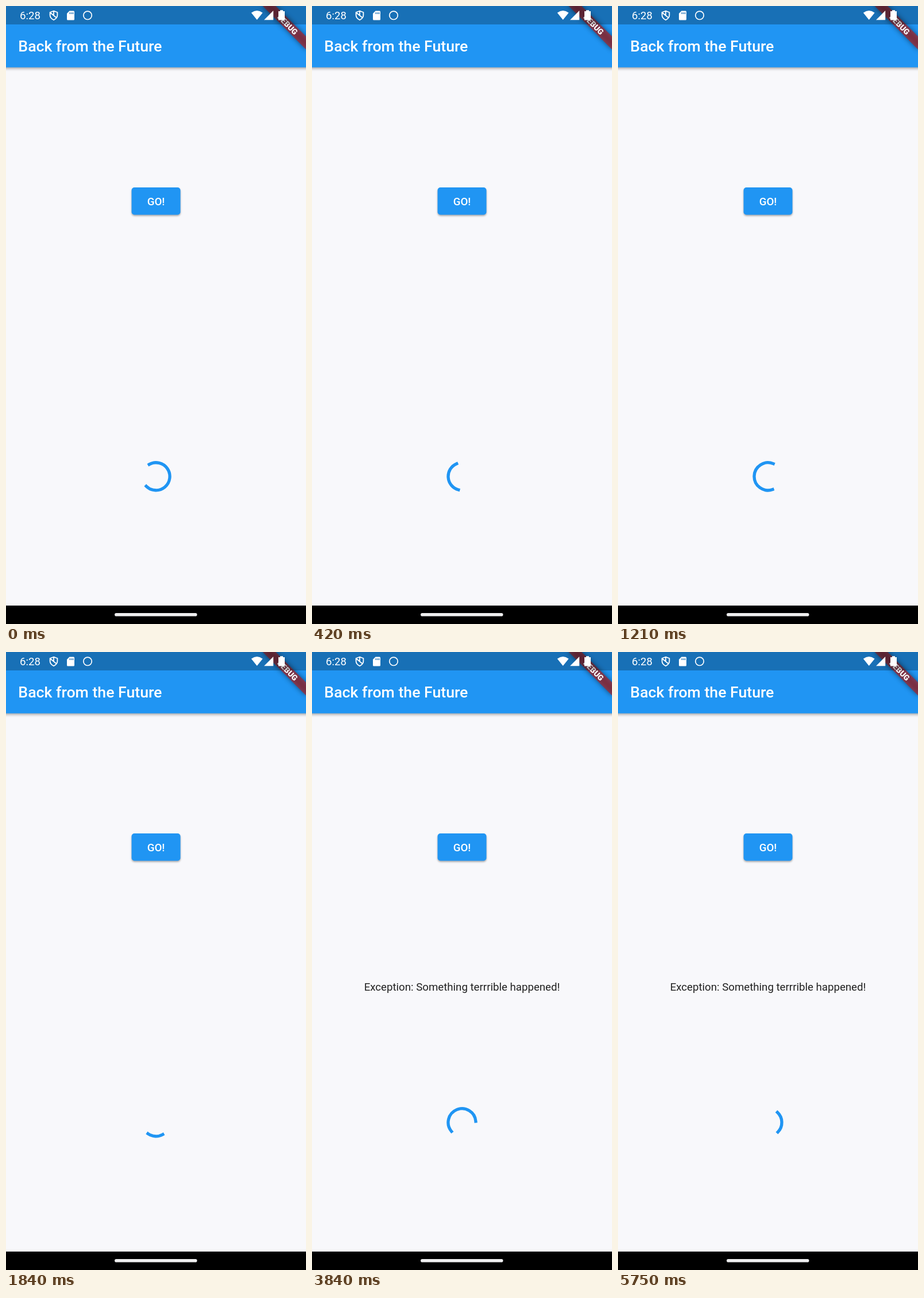
An HTML page for the animation above (5.79 s loop, 522 by 1073 pixels).

```html
<!DOCTYPE html>
<html lang="en">
<head>
<meta charset="utf-8">
<title>Back from the Future</title>
<style>
  html, body { margin: 0; width: 100%; height: 100%; overflow: hidden; background: #f8f8fb; }
  svg { display: block; font-family: Roboto, sans-serif; }
  .bar { filter: drop-shadow(0 2px 2.5px rgba(0, 0, 0, .36)); }
  .button { filter: drop-shadow(0 2px 1.5px rgba(0, 0, 0, .32)); }
  .medium { font-weight: 500; }
</style>
</head>
<body>
<svg width="522" height="1073" viewBox="0 0 522 1073">
  <rect width="522" height="1073" fill="#f8f8fb"/>
  <rect class="bar" x="-10" y="-10" width="542" height="116.5" fill="#2095f3"/>
  <text class="medium" x="21.3" y="79" font-size="26.67" fill="#fff">Back from the Future</text>

  <rect class="button" x="218.5" y="315" width="85" height="47.5" rx="5" fill="#2095f3"/>
  <text class="medium" x="261" y="345.5" font-size="18.67" fill="#fff" text-anchor="middle">GO!</text>

  <text id="message" x="261" y="588" font-size="18.67" fill="#212121" text-anchor="middle">Exception: Something terrrible happened!</text>
  <path id="arc" fill="none" stroke="#2095f3" stroke-width="5.33" stroke-linecap="square"/>

  <!-- debug ribbon -->
  <g transform="translate(522 0) rotate(45)">
    <rect x="-53.3" y="37.3" width="106.6" height="16" opacity=".5" style="filter: blur(5px)"/>
    <rect x="-53.3" y="37.3" width="106.6" height="16" fill="#b71c1c" opacity=".627"/>
    <text y="50.2" font-size="13.6" font-weight="900" fill="#fff" text-anchor="middle">DEBUG</text>
  </g>

  <!-- status bar -->
  <rect width="522" height="32" opacity=".25"/>
  <g fill="#fff">
    <text x="24" y="23" font-size="18.67">6:28</text>
    <path d="M83 8.6L89.4 11V16Q89.2 21.2 83 24.2Q76.8 21.2 76.6 16V11ZM77 11.5L88.5 21M83 9V15.5" fill="none" stroke="#fff" stroke-width="1.8"/>
    <path d="M110.5 8.5H117.5Q119 8.5 119 10V23Q119 24.5 117.5 24.5H107.5Q106 24.5 106 23V13Z"/>
    <path d="M111.3 11V14M114 11V14M116.6 11V14" stroke="#1970b6" stroke-width="1.3"/>
    <circle cx="142" cy="16.3" r="7.2" fill="none" stroke="#fff" stroke-width="1.7"/>
    <path d="M436.7 24L426.8 11.8Q436.7 4.4 446.6 11.8Z"/>
    <path d="M449 24.2H465.2V8Z"/>
    <path d="M477 7.3H482V9H485V24.4H474V9H477Z"/>
  </g>

  <rect y="1041" width="522" height="32"/>
  <rect x="189" y="1054" width="143.5" height="5.6" rx="2.8" fill="#efeff0"/>
</svg>
<script>
  const LOOP = 5790, FRAME = 1000 / 24, MESSAGE_AT = 3300;
  const PATH_PERIOD = 1333, TURN_PERIOD = 2222;
  const CX = 261, CY = 816.8, R = 24;
  const arc = document.getElementById('arc');
  const message = document.getElementById('message');

  // cubic-bezier(.4, 0, .2, 1), clamped outside 0..1
  function ease(x) {
    if (x <= 0) return 0;
    if (x >= 1) return 1;
    let lo = 0, hi = 1, s;
    for (let i = 0; i < 24; i++) {
      s = (lo + hi) / 2;
      const q = 1 - s;
      if (1.2 * q * q * s + .6 * q * s * s + s ** 3 < x) lo = s; else hi = s;
    }
    return 3 * s * s - 2 * s ** 3;
  }

  function point(deg) {
    const a = deg * Math.PI / 180;
    return (CX + R * Math.sin(a)).toFixed(3) + ' ' + (CY - R * Math.cos(a)).toFixed(3);
  }

  function draw(t) {
    const clock = t * 1.0105;
    const cycles = clock / PATH_PERIOD + .354;
    const phase = cycles % 1;
    const head = ease(phase * 2), tail = ease(phase * 2 - 1);
    const start = 298.6 + 360 * clock / TURN_PERIOD + 90 * phase + 270 * tail;
    const sweep = Math.max(270 * (head - tail), .5);
    arc.setAttribute('d', `M${point(start)}A${R} ${R} 0 ${+(sweep > 180)} 1 ${point(start + sweep)}`);
    message.style.visibility = t < MESSAGE_AT ? 'hidden' : 'visible';
  }

  function tick() {
    const t = performance.now() % LOOP;
    draw(Math.floor((t + 5) / FRAME) * FRAME);
    requestAnimationFrame(tick);
  }
  tick();
</script>
</body>
</html>
```
